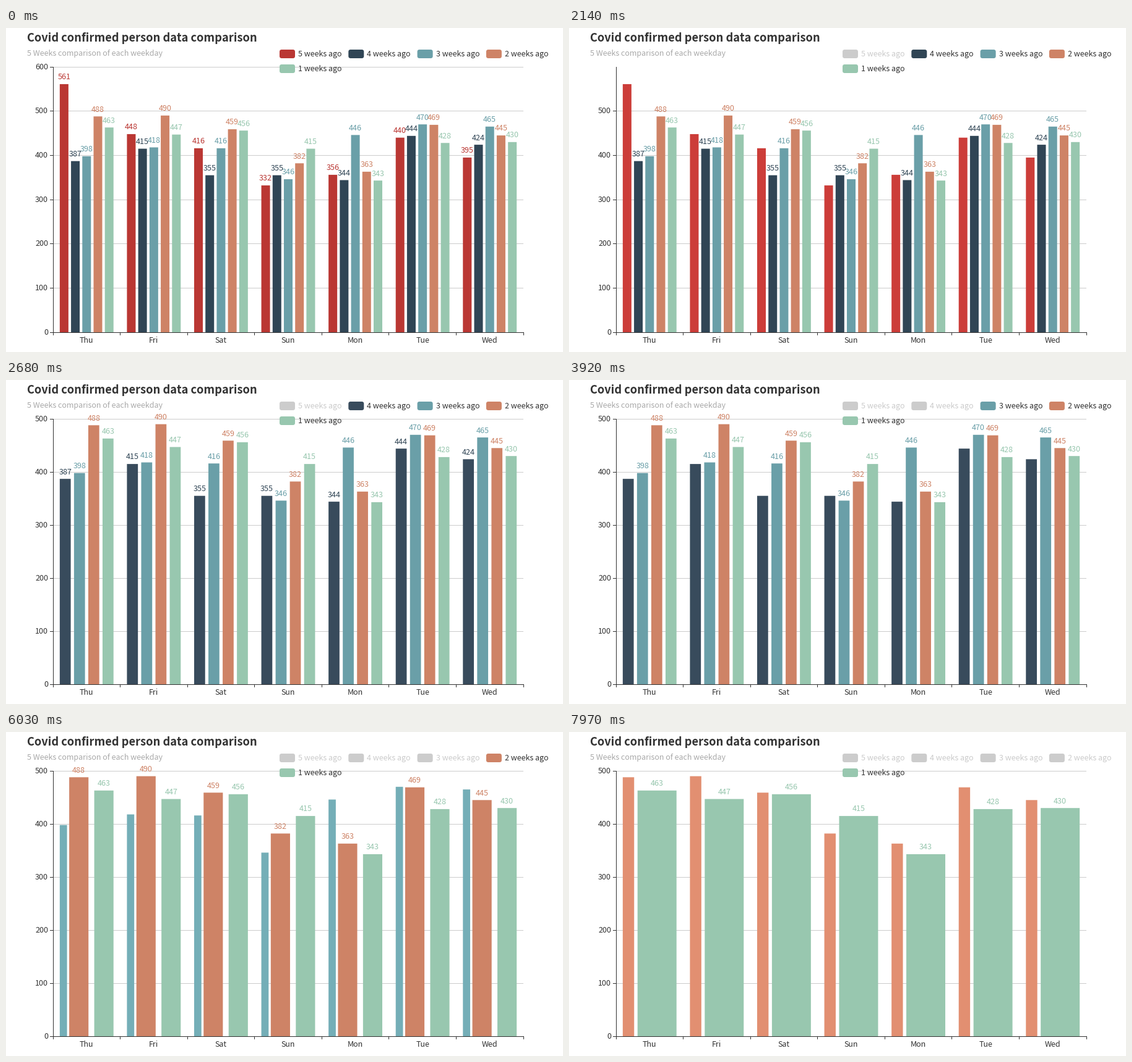
These frames come from a looping animation (900x525 px, 8000 ms). A matplotlib script:

```python
import math

import matplotlib.pyplot as plt
from matplotlib.animation import FuncAnimation
from matplotlib.collections import LineCollection, PolyCollection
from matplotlib.patches import FancyBboxPatch

W, H, DPI = 900, 525, 100
LOOP, STEP = 8000, 20
PX = 72 / DPI  # points per pixel

LEFT, RIGHT, TOP, BASE = 76, 836, 63, 493
DAYS = ["Thu", "Fri", "Sat", "Sun", "Mon", "Tue", "Wed"]
BAND = (RIGHT - LEFT) / len(DAYS)
INNER = BAND * 0.8
GAP = 0.3

SERIES = [
    # values, colour, hover colour
    ([561, 448, 416, 332, 356, 440, 395], "#ba3733", "#cc3d39"),
    ([387, 415, 355, 355, 344, 444, 424], "#304555", "#384b5c"),
    ([398, 418, 416, 346, 446, 470, 465], "#6a9fa8", "#74aeb7"),
    ([488, 490, 459, 382, 363, 469, 445], "#ce8366", "#e28f71"),
    ([463, 447, 456, 415, 343, 428, 430], "#98c7af", "#a7dbc1"),
]
N = len(SERIES)

CLICKS = [2140, 3920, 5950, 7890]  # each hides the next series
HOVERS = [(0, None), (500, 4), (750, None), (900, 0), (2450, 1),
          (4220, 2), (6250, None), (6810, 3)]
TICK, LAG, DURATION = 76, 12, 300

plt.rcParams["font.family"] = ["Noto Sans CJK JP", "DejaVu Sans"]
fig = plt.figure(figsize=(W / DPI, H / DPI), dpi=DPI, facecolor="white")
ax = fig.add_axes([0, 0, 1, 1])
ax.set(xlim=(0, W), ylim=(H, 0))
ax.axis("off")


def write(x, y, text, size=12.5, color="#333", **kw):
    return ax.text(x, y, text, fontsize=size * PX, color=color,
                   va="baseline", **kw)


def lines(color, z, segments=()):
    art = LineCollection(segments, colors=color, linewidths=PX, zorder=z,
                         capstyle="butt")
    art.set_snap(False)
    return ax.add_collection(art, autolim=False)


def crisp(v):
    return math.floor(v + 1e-6) + 0.5


def lerp(a, b, p):
    return a + (b - a) * p


def bar_slot(i, hidden):
    """Offset in the band and width of bar i when the first few are hidden."""
    n = N - hidden
    width = INNER / (n + GAP * (n - 1))
    return (i - hidden) * (1 + GAP) * width, width


def y_max(hidden):
    return 500 if hidden else 600


def px_per_unit(hidden):
    return (BASE - TOP) / y_max(hidden)


# Titles
write(33.5, 22, "Covid confirmed person data comparison", 18.25,
      weight="bold")
write(33.5, 45, "5 Weeks comparison of each weekday", color="#aaa")

# Axes
grid = lines("#ccc", 1)
y_ticks = lines("#333", 2)
frame = [[(LEFT + 0.5, TOP), (LEFT + 0.5, BASE + 1)],
         [(LEFT, BASE + 0.5), (RIGHT + 1, BASE + 0.5)]]
for k in range(len(DAYS) + 1):
    x = crisp(LEFT + k * BAND)
    frame.append([(x, BASE), (x, BASE + 5)])
lines("#333", 2, frame)
for k, day in enumerate(DAYS):
    write(LEFT + (k + 0.5) * BAND, 510, day, ha="center")
y_labels = [write(68, 0, str(v), ha="right") for v in range(0, 601, 100)]

# Bars with their value labels
bars, values = [], []
for i, (data, color, _) in enumerate(SERIES):
    art = PolyCollection([], facecolors=color, edgecolors="none", zorder=3 + i)
    art.set_snap(False)
    bars.append(ax.add_collection(art, autolim=False))
    values.append([write(0, 0, str(v), color=color, ha="center",
                         zorder=3.5 + i) for v in data])

# Legend
icons, names = [], []
for i in range(N):
    x, y = 442 + 111.3 * (i % 4), 35 + 24 * (i // 4)
    icon = FancyBboxPatch((x, y), 25, 14, linewidth=0, zorder=20, snap=False,
                          boxstyle="round,pad=0,rounding_size=3.5")
    icons.append(ax.add_patch(icon))
    names.append(write(x + 30, y + 11, f"{N - i} weeks ago", zorder=21))


def progress(elapsed):
    """Cubic ease-out, refreshed in coarse ticks."""
    k = int(elapsed // TICK)
    if k >= 4:
        return 1.0
    return 1 - (1 - max(0, k * TICK - LAG) / DURATION) ** 3


def draw_axis(unit, top):
    levels = range(0, top + 1, 100)
    ys = [crisp(BASE - v * unit) for v in levels]
    grid.set_segments([[(LEFT, y), (RIGHT, y)] for y in ys[1:]])
    y_ticks.set_segments([[(LEFT - 5, y), (LEFT, y)] for y in ys])
    for k, label in enumerate(y_labels):
        label.set_visible(k < len(ys))
        if k < len(ys):
            label.set_y(ys[k] + 3.5)


def draw_bars(i, offset, width, unit, labelled):
    boxes = []
    for k, v in enumerate(SERIES[i][0]):
        x0 = LEFT + (k + 0.1) * BAND + offset
        x1, top = x0 + width, BASE - v * unit
        boxes.append([(x0, BASE), (x0, top), (x1, top), (x1, BASE)])
        label = values[i][k]
        label.set_visible(labelled)
        label.set_position(((x0 + x1) / 2, top - 7.6))
    bars[i].set_visible(width > 0)
    bars[i].set_verts(boxes)


def update(n):
    t = n * STEP + STEP / 2
    hidden = sum(t >= c for c in CLICKS)
    before = max(hidden - 1, 0)
    p = progress(t - CLICKS[hidden - 1]) if hidden else 1.0
    hover = [s for start, s in HOVERS if t >= start][-1]
    unit = lerp(px_per_unit(before), px_per_unit(hidden), p)

    draw_axis(unit, y_max(hidden))
    for i, (_, color, lifted) in enumerate(SERIES):
        shown = i >= hidden
        leaving = i == hidden - 1
        x0, w0 = bar_slot(i, before)
        if shown:
            x1, w1 = bar_slot(i, hidden)
            draw_bars(i, lerp(x0, x1, p), lerp(w0, w1, p), unit, True)
        else:
            width = lerp(w0, 0, p) if leaving else 0
            draw_bars(i, 0, width, px_per_unit(before), False)
        fill = lifted if i == hover or leaving else color
        bars[i].set_facecolor(fill)
        icons[i].set_facecolor(fill if shown else "#ccc")
        names[i].set_color("#333" if shown else "#ccc")


anim = FuncAnimation(fig, update, frames=LOOP // STEP, interval=STEP,
                     init_func=lambda: update(0), repeat=True, repeat_delay=0)
plt.show()
```
